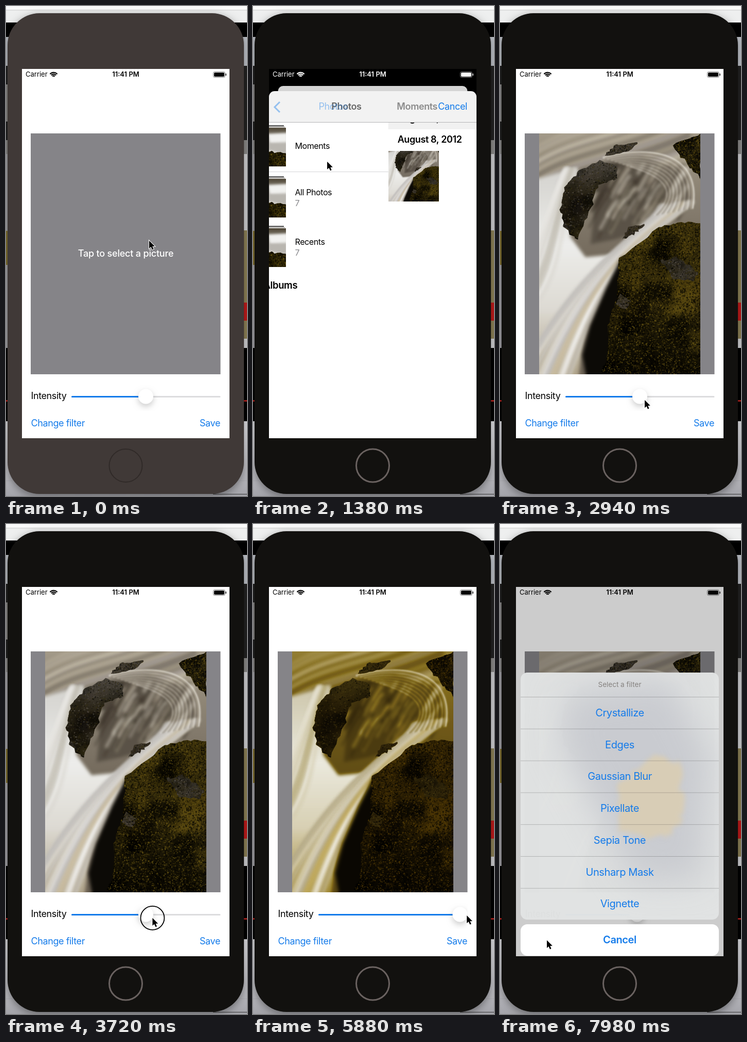
These frames come from a looping animation (468x950 px, 8000 ms). An HTML page with a canvas:

```html
<!DOCTYPE html>
<html lang="en">
<head>
<meta charset="utf-8">
<title>Photo filter app</title>
<style>
html, body { margin: 0; width: 100%; height: 100%; overflow: hidden; background: #ddd; }
canvas { display: block; }
</style>
</head>
<body>
<canvas id="stage" width="468" height="950"></canvas>
<script>
const LOOP = 8000, STEP = 60;
const SCREEN = { x: 31, y: 122, w: 403, h: 716 };
const CENTER = 232.5, SHEET_TOP = 165, BOTTOM = 838;
const BLUE = '#147bea';
const ctx = document.getElementById('stage').getContext('2d');

// ---- timing ----
const clamp = (v, low = 0, high = 1) => Math.max(low, Math.min(high, v));
const mix = (a, b, k) => a + (b - a) * k;
function ease(t, start, length) {
  const k = clamp((t - start) / length);
  return k < .5 ? 4 * k ** 3 : 1 - 4 * (1 - k) ** 3;
}

const TAP = 120, TRAVEL = 600, OPEN = 180, PUSH = 1200, DISMISS = 1922, MENU = 7560;
const DRAG_START = 3060, DRAG_END = 6900, RENDER_LAG = 580;

// Where the pointer arrives, and how long it then presses.
const STOPS = [
  { at: 60, x: 278, y: 455, press: TAP },
  { at: 840, x: 258, y: 388 },
  { at: 1080, x: 200, y: 276, press: TAP },
  { at: 1620, x: 104, y: 320, press: TAP },
  { at: 2900, x: 281, y: 764 },
  { at: DRAG_START, x: 281, y: 764, press: 2300 },
  { at: 4260, x: 404, y: 758 },
  { at: 5280, x: 426, y: 760 },
  { at: 6200, x: 402, y: 758, press: 700 },
  { at: 6850, x: 280, y: 760 },
  { at: 7400, x: 91, y: 807, press: TAP }
];

function cursorAt(t) {
  let { x, y, at } = STOPS[0];
  for (const stop of STOPS.slice(1)) {
    const length = Math.min(TRAVEL, stop.at - at);
    const k = clamp((t - stop.at + length) / length), smooth = k * k * (3 - 2 * k);
    x = mix(x, stop.x, smooth);
    y = mix(y, stop.y, smooth);
    at = stop.at;
  }
  return { x, y };
}

// The knob trails the pointer because the filter renders slowly.
const knobAt = t => clamp(cursorAt(clamp(t - RENDER_LAG, DRAG_START, DRAG_END)).x - 9.5, 141.5, 402);
const sepiaAt = t => .9 * ((knobAt(t) - 141.5) / 260.5) ** 4;

// ---- drawing helpers ----
function rect(c, x, y, w, h, fill) { c.fillStyle = fill; c.fillRect(x, y, w, h); }

function box(x, y, w, h, r, fill) {
  ctx.beginPath();
  ctx.roundRect(x, y, w, h, r);
  ctx.fillStyle = fill;
  ctx.fill();
}

function text(s, x, y, { size = 18, weight = 400, color = '#000', align = 'left', gap = -.4 } = {}) {
  ctx.font = `${weight} ${size}px Inter, Roboto, sans-serif`;
  ctx.letterSpacing = gap + 'px';
  ctx.textAlign = align;
  ctx.textBaseline = 'middle';
  ctx.fillStyle = color;
  ctx.fillText(s, x, y);
}

function chevron(x, y, w, h, color, width) {
  ctx.beginPath();
  ctx.moveTo(x, y - h);
  ctx.lineTo(x + w, y);
  ctx.lineTo(x, y + h);
  ctx.strokeStyle = color;
  ctx.lineWidth = width;
  ctx.stroke();
}

function ring(x, y, r, color, width) {
  ctx.beginPath();
  ctx.arc(x, y, r, 0, 7);
  ctx.strokeStyle = color;
  ctx.lineWidth = width;
  ctx.stroke();
}

function scoped(draw) { ctx.save(); draw(); ctx.restore(); }

function clipBox(x, y, w, h, r = 0) {
  ctx.beginPath();
  ctx.roundRect(x, y, w, h, r);
  ctx.clip();
}

function gradient(c, y0, y1, ...colors) {
  const g = c.createLinearGradient(0, y0, 0, y1);
  colors.forEach((color, i) => g.addColorStop(i / (colors.length - 1), color));
  return g;
}

function randomizer(seed) {
  return () => (seed = (seed * 16807) % 2147483647) / 2147483647;
}

function offscreen(w, h, draw) {
  const canvas = document.createElement('canvas');
  canvas.width = w;
  canvas.height = h;
  draw(canvas.getContext('2d'));
  return canvas;
}

function poly(c, xy, fill) {
  c.beginPath();
  for (let i = 0; i < xy.length; i += 2) c.lineTo(xy[i], xy[i + 1]);
  c.closePath();
  c.fillStyle = fill;
  c.fill();
}

// Breaks each edge into short, randomly displaced pieces.
function roughen(xy, rnd, jitter = 5) {
  const out = [], n = xy.length, parts = 7;
  for (let i = 0; i < n; i += 2)
    for (let k = 0; k < parts; k++)
      for (const axis of [0, 1])
        out.push(mix(xy[i + axis], xy[(i + 2) % n + axis], k / parts) + (rnd() - .5) * jitter);
  return out;
}

// A jagged stone with soft patches and fine grain.
function rock(c, xy, fill, tones, rnd, grain) {
  const xs = xy.filter((_, i) => i % 2 === 0), ys = xy.filter((_, i) => i % 2);
  const left = Math.min(...xs), top = Math.min(...ys);
  const w = Math.max(...xs) - left, h = Math.max(...ys) - top;
  const dab = (i, size, alpha) => {
    c.globalAlpha = alpha * rnd();
    rect(c, left + rnd() * w - size / 2, top + rnd() * h - size / 2,
      size * (.5 + rnd()), size * (.5 + rnd()), tones[i % tones.length]);
  };
  c.save();
  poly(c, roughen(xy, rnd), fill);
  c.clip();
  c.filter = 'blur(4px)';
  for (let i = 0; i < 40; i++) dab(i, Math.min(w, h) / 5, .7);
  c.filter = 'none';
  for (let i = 0; i < grain; i++) dab(i, 2, .8);
  c.restore();
}

// ---- pictures ----
const MOSS = ['#000', '#51430f', '#151105', '#6e5c16', '#000'];
const SLATE = ['#080704', '#57524c', '#241f14', '#3a3215'];

const river = offscreen(313, 467, c => {
  const rnd = randomizer(71);
  const streak = (color, width, alpha, x, y, ...curve) => {
    c.globalAlpha = alpha;
    c.strokeStyle = color;
    c.lineWidth = width;
    c.beginPath();
    c.moveTo(x, y);
    c.bezierCurveTo(...curve);
    c.stroke();
    c.globalAlpha = 1;
  };
  c.lineCap = 'round';
  rect(c, 0, 0, 313, 467, gradient(c, 0, 300, '#a39b8d', '#857d72', '#6a6156'));
  c.filter = 'blur(3px)';

  // sheet of water across the top
  for (let i = 0; i < 36; i++) {
    const y = rnd() * 130 - 30;
    streak(['#d6cdb9', '#6d665f', '#b3aeaa'][i % 3], 2 + rnd() * 6, .45,
      -10, y + 60, 70, y + 10, 130, y + 15, 290, y - 50);
  }
  // white water on the left
  poly(c, [-9, 90, 75, 66, 60, 200, 90, 240, 164, 233, 124, 293, 89, 373, 76, 476, -9, 476],
    gradient(c, 90, 467, '#d8d7d4', '#eeeeec', '#dedbd5', '#b0a58f'));
  // dark pool with splashes running down to the left
  poly(c, [120, 60, 200, 45, 280, 75, 295, 130, 240, 175, 150, 205, 100, 215, 110, 120], '#5b534a');
  for (let i = 0; i < 120; i++) {
    const x = 105 + rnd() * 185, y = 60 + rnd() * 95, length = 15 + rnd() * 45;
    streak(['#e2ddd4', '#29231b', '#8f877b', '#3f372d', '#a39a8c'][i % 5], 3 + rnd() * 6, .5,
      x, y, x - length / 4, y + length / 4, x - length / 3, y + length / 2, x - length / 1.6, y + length);
  }
  // main stream: sweeps in from the right and falls to the lower left
  for (let i = 0; i < 44; i++) {
    const k = rnd();
    streak(['#fff', '#e4e2de', '#c6b99d', '#aaa7a6'][i % 4], 2 + rnd() * 8, .55,
      305 - k * 70, 132 + k * 10, 215, 200 - k * 10, 150 - k * 70, 215 + k * 30, 68 - k * 110, 475);
  }
  for (let i = 0; i < 24; i++) {
    const x = rnd() * 60;
    streak(['#fff', '#bcb6ad'][i % 2], 3 + rnd() * 6, .4, 70 - x / 3, 70, 45 - x / 2, 140, 50 - x, 250, -x, 320);
  }
  // shadow between the stream and the big rock
  poly(c, [160, 240, 130, 300, 99, 373, 84, 430, 92, 476, 180, 476, 190, 240], '#0c0a06');
  c.filter = 'blur(1.5px)';
  for (let i = 0; i < 22; i++) {
    const d = i * 2.5;
    streak(['#f0ece4', '#aaa295', '#716961'][i % 3], 3, i < 2 ? .9 : .4,
      125 + d, 47 + d / 3, 230 - d / 2, 20 + d, 315 - d / 2, 45 + d, 298 - d * 1.4, 145 + d / 4);
  }
  c.filter = 'none';

  rock(c, [49, 103, 79, 71, 119, 53, 149, 61, 152, 88, 114, 98, 102, 143, 74, 208, 49, 183, 42, 148],
    gradient(c, 55, 200, '#48443e', '#262013', '#080703'), SLATE, rnd, 2000);
  rock(c, [125, 44, 150, 22, 195, 17, 180, 32], '#4a453d', SLATE, rnd, 500);
  rock(c, [258, 24, 313, 0, 313, 88, 290, 62], '#1f1b0e', MOSS, rnd, 1500);
  rock(c, [160, 205, 178, 180, 206, 177, 180, 198], '#413a32', SLATE, rnd, 300);
  rock(c, [156, 243, 232, 183, 270, 172, 318, 172, 318, 472, 114, 472, 129, 443, 136, 363, 152, 313],
    gradient(c, 180, 467, '#3b310c', '#2e260a', '#060502'), MOSS, rnd, 14000);
  rock(c, [236, 246, 270, 240, 308, 270, 300, 286, 260, 282], '#37332d', SLATE, rnd, 900);
  rock(c, [146, 332, 158, 313, 178, 325, 170, 340], '#4a443b', SLATE, rnd, 300);
});

const falls = offscreen(75, 75, c => {
  const rnd = randomizer(19);
  rect(c, 0, 0, 75, 75, gradient(c, 0, 45, '#4d4434', '#9c978d', '#d8d6d2'));
  c.filter = 'blur(2px)';
  poly(c, [0, 0, 34, 0, 30, 14, 0, 26], '#40371c');
  poly(c, [40, 12, 78, 10, 78, 34, 44, 32], '#f1f1ef');
  poly(c, [26, 30, 78, 28, 78, 52, 40, 42], '#b9b6b0');
  c.filter = 'none';
  rock(c, [-3, 26, 14, 30, 26, 42, 46, 46, 78, 52, 78, 78, -3, 78], '#2c2407', MOSS, rnd, 1300);
});

function picture(x, y, w, h, sepia) {
  scoped(() => {
    ctx.drawImage(river, x, y, w, h);
    ctx.globalCompositeOperation = 'overlay';
    ctx.globalAlpha = sepia;
    rect(ctx, x, y, w, h, '#66550f');
  });
}

// ---- desktop and phone ----
function desktop() {
  const rnd = randomizer(5);
  rect(ctx, 0, 0, 468, 950, gradient(ctx, 805, 950, '#e2e2e6', '#c9c9ce', '#a4a4aa'));
  rect(ctx, 0, 0, 468, 32, '#eeefef');
  rect(ctx, 0, 0, 468, 7, '#fafafa');
  rect(ctx, 0, 7, 468, 2, '#dedede');
  rect(ctx, 0, 32, 468, 773, '#000');
  for (const x of [0, CENTER]) {
    rect(ctx, x, 60, 236, 56, '#bfc3ca');
    for (let y = 116; y < 280; y += 36) rect(ctx, x, y, 236, 36, rnd() < .6 ? '#222' : '#8c8b8a');
    rect(ctx, x, 287, 236, 376, x ? '#d3d3d6' : '#a5a4a9');
  }
  rect(ctx, 0, 436, 8, 66, '#857433');
  rect(ctx, 460, 435, 8, 210, '#8f8358');
  rect(ctx, 460, 575, 8, 35, '#c11b1b');
  rect(ctx, 0, 764, 468, 3, '#b3211d');
  rect(ctx, 0, 920, 468, 1, '#aaaab0');
  rect(ctx, 402, 946, 66, 1, '#333');
}

function phone(body, button, buttonWidth) {
  scoped(() => {
    ctx.shadowColor = 'rgba(0,0,0,.4)';
    ctx.shadowBlur = 16;
    ctx.shadowOffsetY = 4;
    box(3, 14, 459, 932, 62, body);
  });
  ring(CENTER, 891, 32, button, buttonWidth);
}

function statusBar(light) {
  const shade = Math.round(255 * light), color = `rgb(${shade},${shade},${shade})`;
  text('Carrier', 38, 133.5, { size: 13, color, gap: 0 });
  text('11:41 PM', CENTER, 133.5, { size: 13, weight: 600, color, align: 'center', gap: 0 });
  for (const r of [3, 6.3, 9.6]) {
    ctx.beginPath();
    ctx.arc(92.5, 138.5, r, -Math.PI * .76, -Math.PI * .24);
    ctx.strokeStyle = color;
    ctx.lineWidth = 2.3;
    ctx.stroke();
  }
  ctx.beginPath();
  ctx.roundRect(402.5, 127.5, 23, 11, 3);
  ctx.lineWidth = 1;
  ctx.globalAlpha = .5;
  ctx.stroke();
  ctx.globalAlpha = 1;
  box(404, 129, 20, 8, 1.8, color);
  rect(ctx, 426.5, 131, 1.3, 4, color);
}

// ---- app screens ----
function editor(t, radius) {
  box(SCREEN.x, SCREEN.y, SCREEN.w, SCREEN.h, radius, '#fff');
  rect(ctx, 48, 247, 368.5, 467, '#858488');
  if (t < DISMISS) text('Tap to select a picture', CENTER, 481, { weight: 500, color: '#fff', align: 'center', gap: -.2 });
  else picture(76, 247, 313, 467, sepiaAt(t));

  const knob = knobAt(t);
  text('Intensity', 48.5, 757);
  box(127, 756, 289.5, 3, 1.5, '#dcdcde');
  box(127, 756, knob - 127, 3, 1.5, BLUE);
  scoped(() => {
    clipBox(120, 735, 296.5, 50);
    ctx.shadowColor = 'rgba(0,0,0,.2)';
    ctx.shadowBlur = 12;
    ctx.shadowOffsetY = 5;
    box(knob - 14.5, 742.5, 29, 29, 14.5, '#fff');
  });
  text('Change filter', 48.5, 810, { color: BLUE });
  text('Save', 416, 810, { color: BLUE, align: 'right' });
}

function album(y, name, count) {
  rect(ctx, 45, y - 4.5, 66, 1.5, '#111');
  rect(ctx, 42, y - 2, 71, 1, '#77736c');
  ctx.drawImage(falls, 40, y);
  text(name, 132.5, y + (count ? 27 : 36), { size: 16 });
  if (count) text(count, 132.5, y + 48, { size: 16, color: '#87878b' });
  chevron(408, y + 37, 6.5, 6, '#bcbcc0', 2);
}

function albumList() {
  rect(ctx, 31, 226, 403, 612, '#fff');
  album(236, 'Moments');
  rect(ctx, 31, 321, 403, 1, '#d5d5d8');
  album(335, 'All Photos', '7');
  album(431, 'Recents', '7');
  text('My Albums', 40, 542, { size: 18.5, weight: 600 });
}

function moments() {
  rect(ctx, 31, 226, 403, 612, '#fff');
  rect(ctx, 31, 226, 403, 13, '#f1f1f1');
  for (const y of [219, 260]) text('August 8, 2012', 49, y, { weight: 600 });
  ctx.drawImage(river, 0, 77, 313, 313, 31, 281, 98, 98);
}

function picker(t, offset) {
  const push = ease(t, PUSH, 380);
  ctx.translate(0, offset);
  clipBox(31, SHEET_TOP, 403, 700, [11, 11, 0, 0]);
  scoped(() => { ctx.translate(-120 * push, 0); albumList(); });
  if (push > 0) scoped(() => { ctx.translate(403 * (1 - push), 0); moments(); });
  rect(ctx, 31, SHEET_TOP, 403, 60, '#f2f2f2');
  rect(ctx, 31, 225, 403, 1, '#b4b4b6');
  scoped(() => {
    ctx.globalAlpha = 1 - push;
    text('Photos', CENTER - 120 * push, 196, { weight: 600, align: 'center' });
    ctx.globalAlpha = push;
    text('Moments', CENTER + 150 * (1 - push), 196, { weight: 600, align: 'center' });
    text('Photos', 58.5 + 120 * (1 - push), 196, { color: BLUE });
    chevron(52, 196, -10, 10, BLUE, 3);
  });
  text('Cancel', 416, 196, { color: BLUE, align: 'right' });
}

const FILTERS = ['Crystallize', 'Edges', 'Gaussian Blur', 'Pixellate', 'Sepia Tone', 'Unsharp Mask', 'Vignette'];

function filterMenu(shown) {
  rect(ctx, SCREEN.x, SCREEN.y, SCREEN.w, SCREEN.h, `rgba(0,0,0,${.2 * shown})`);
  ctx.translate(0, 560 * (1 - shown));
  scoped(() => {
    clipBox(40, 288, 385, 479, 13);
    rect(ctx, 40, 288, 385, 479, 'rgba(226,228,228,.98)');
    ctx.filter = 'blur(32px)';
    poly(ctx, [130, 330, 330, 300, 410, 450, 390, 690, 260, 690, 120, 430], '#c9cbd0');
    ctx.filter = 'blur(4px)';
    poly(ctx, roughen([236, 505, 300, 452, 350, 462, 352, 570, 325, 608, 225, 600], randomizer(3), 16), '#d8cdb6');
    ctx.filter = 'none';
    FILTERS.forEach((_, i) => rect(ctx, 40, 335 + i * 61.8, 385, 1, 'rgba(0,0,0,.2)'));
  });
  text('Select a filter', CENTER, 312, { size: 13.5, color: '#85827f', align: 'center', gap: 0 });
  FILTERS.forEach((name, i) =>
    text(name, CENTER, 367 + i * 61.7, { size: 20, color: BLUE, align: 'center' }));
  box(40, 776, 385, 61, 13, '#fff');
  text('Cancel', CENTER, 807, { size: 20, weight: 600, color: BLUE, align: 'center' });
}

function pointer(t) {
  const { x, y } = cursorAt(t);
  if (STOPS.some(s => s.press && t >= s.at && t < s.at + s.press)) ring(x, y, 23, '#000', 1.8);
  ctx.translate(x, y);
  ctx.lineWidth = 2;
  ctx.strokeStyle = '#fff';
  const arrow = [0, 0, 0, 15, 3.5, 12, 6, 17.5, 8.6, 16.3, 6.2, 11, 10.8, 10.8];
  poly(ctx, arrow, '#000');
  ctx.stroke();
  poly(ctx, arrow, '#000');
}

function render(t) {
  desktop();
  if (t < STEP) phone('#403937', '#302a28', 2);
  else phone('#12110f', '#6a6260', 3);

  const open = ease(t, OPEN, 500) - ease(t, DISMISS, 500);
  scoped(() => {
    clipBox(SCREEN.x, SCREEN.y, SCREEN.w, SCREEN.h);
    rect(ctx, SCREEN.x, SCREEN.y, SCREEN.w, SCREEN.h, '#000');
    scoped(() => {
      const scale = 1 - .087 * open;
      ctx.translate(CENTER, SCREEN.y + 33 * open);
      ctx.scale(scale, scale);
      ctx.translate(-CENTER, -SCREEN.y);
      editor(t, 11 * open);
      box(SCREEN.x, SCREEN.y, SCREEN.w, SCREEN.h, 11 * open, `rgba(0,0,0,${.17 * open})`);
    });
    statusBar(Math.min(1, open * 2.3));
    if (open > 0) scoped(() => picker(t, (BOTTOM - SHEET_TOP) * (1 - open)));
    const menu = ease(t, MENU, 400);
    if (menu > 0) scoped(() => filterMenu(menu));
  });
  scoped(() => pointer(t));
}

const start = performance.now();
function tick() {
  const t = (performance.now() - start) % LOOP;
  render(Math.floor(t / STEP) * STEP);
  requestAnimationFrame(tick);
}
tick();
</script>
</body>
</html>
```
